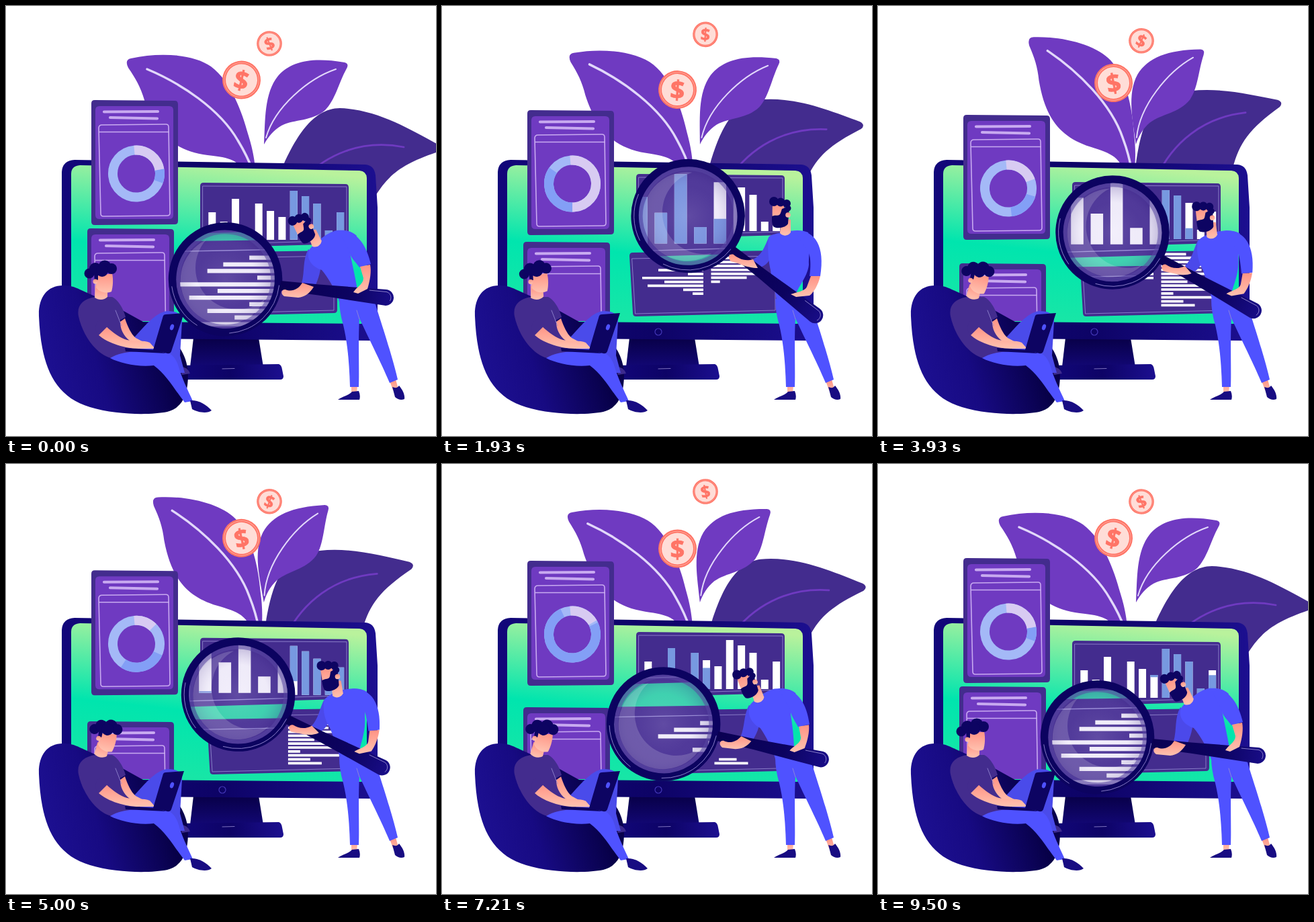
Write an HTML page that moves like this. It is 640x640 px and loops after 9570 ms.

```html
<!DOCTYPE html>
<html lang="en">
<head>
<meta charset="utf-8">
<title>Data analysis</title>
<style>
  html, body { margin: 0; width: 100%; height: 100%; overflow: hidden; background: #fff; }
  svg { display: block; width: 100vw; height: 100vh; }
  .violet { fill: #6f3ac1; }
  .plum { fill: #432c8e; }
  .navy { fill: #0d0462; }
  .shoe { fill: #180c82; }
  .blue { fill: #4f52ff; }
  .skin { fill: url(#skin); }
  .vein, .thin { fill: none; stroke-linecap: round; }
  .thin { stroke: #9a8fd6; stroke-width: .8; }
  .card { fill: none; stroke: #c8aaf0; stroke-width: 1.6; }
  .bold { stroke-width: 4.2; stroke-linecap: round; }
  .dollar { font: 700 38px "Open Sans", sans-serif; fill: #ff7466; stroke: #ff7466; stroke-width: .8; text-anchor: middle; }
  .ring { fill: none; stroke-width: 14; }
</style>
</head>
<body>
<svg viewBox="0 0 640 640">
  <defs>
    <linearGradient id="green" x1=".6" y1="0" x2=".4" y2="1">
      <stop offset="0" stop-color="#b9f29c"/><stop offset=".57" stop-color="#00e5ae"/><stop offset="1" stop-color="#19e6a6"/>
    </linearGradient>
    <linearGradient id="bezel">
      <stop offset="0" stop-color="#12077a"/><stop offset=".5" stop-color="#0d0366"/><stop offset="1" stop-color="#1c0f90"/>
    </linearGradient>
    <linearGradient id="stand" x2="0" y2="1">
      <stop offset="0" stop-color="#080048"/><stop offset="1" stop-color="#120774"/>
    </linearGradient>
    <linearGradient id="bag" x1="0" y1=".55" x2="1" y2=".3">
      <stop offset="0" stop-color="#1d1092"/><stop offset=".35" stop-color="#170a82"/><stop offset=".8" stop-color="#070047"/><stop offset="1" stop-color="#0a0252"/>
    </linearGradient>
    <linearGradient id="grip">
      <stop offset="0" stop-color="#0a0052"/><stop offset=".6" stop-color="#0c0360"/><stop offset="1" stop-color="#190d88"/>
    </linearGradient>
    <linearGradient id="skin" x2="0" y2="1">
      <stop offset="0" stop-color="#ff9384"/><stop offset="1" stop-color="#ffc2b0"/>
    </linearGradient>
    <radialGradient id="glass">
      <stop offset="0" stop-color="#c9b8f0" stop-opacity=".22"/><stop offset=".6" stop-color="#9a82d8" stop-opacity=".16"/><stop offset="1" stop-color="#432c8e" stop-opacity=".36"/>
    </radialGradient>
    <clipPath id="hole"><circle id="holeCircle" r="74"/></clipPath>
    <clipPath id="above"><path d="M0 0H640V469H0Z"/></clipPath>
    <g id="coin">
      <circle r="28.5" fill="#ff7466"/>
      <circle r="25.8" fill="none" stroke="#ffa89c" stroke-width="1"/>
      <circle r="23.5" fill="#ffddd7"/>
    </g>
    <g id="sheet">
      <path class="plum" d="M5 0 124 1Q129 1 129 6V180Q129 185 124 185L5 186Q0 186 0 181V5Q0 0 5 0Z"/>
      <path class="violet" d="M12 9H116Q122 9 122 15V171Q122 177 116 177H12Q6 177 6 171V15Q6 9 12 9Z"/>
      <path class="card bold" d="M19 17.5 99 17M28 26 98 27.5"/>
      <path class="card" d="M16 37 111 36Q115 36 115 40L117 168Q117 172 113 172L18 173Q14 173 14 169L11 42Q11 37 16 37ZM11 47.5H116"/>
    </g>
  </defs>

  <g id="darkLeaf">
    <path class="plum" d="M400 300C403 260 410 243 414 234C430 200 455 152 497 152C553 154 602 184 643 206Q651 212 643 217C590 235 570 250 549 284L480 345Z"/>
    <path class="vein" stroke="#6f3ac1" stroke-width="2.8" d="M436 264C475 220 530 198 592 210"/>
  </g>
  <g id="leftLeaf">
    <path class="violet" d="M186 78C230 68 280 72 305 90C335 112 352 160 360 190C367 212 371 230 373 265L362 256C345 228 335 226 300 222C250 216 225 190 206 140C200 120 193 108 182 92Q176 80 186 78Z"/>
    <path class="vein" stroke="#e2d8fa" stroke-width="3.4" d="M210 94C260 115 318 153 345 200C353 213 361 228 368 247"/>
  </g>
  <g id="rightLeaf">
    <path class="violet" d="M384 206C386 170 384 130 405 104C425 82 455 76 504 84Q511 86 507 93C495 115 490 140 475 155C455 172 430 168 410 178C398 185 390 195 384 206Z"/>
    <path class="vein" stroke="#e2d8fa" stroke-width="2" d="M491 94C450 108 400 150 387 196"/>
  </g>
  <g id="bigCoin"><use href="#coin"/><text class="dollar" y="14">$</text></g>
  <g id="smallCoin"><use href="#coin"/><text class="dollar" y="14">$</text></g>

  <path fill="url(#stand)" d="M279 494H376L383 537H274Z"/>
  <path fill="url(#bezel)" d="M255 535 406 533Q410 534 411 541L413 551Q413 556 408 556H255Z"/>
  <path class="thin" stroke="#3a2fae" d="M322 540 340 539.5"/>
  <path fill="url(#bezel)" d="M102 229 535 236Q548 237 550 252L553 300V488Q553 498 543 498L100 494Q84 493 83 478V247Q84 230 102 229Z"/>
  <path fill="url(#green)" d="M110 237 526 245Q537 246 537 257V464Q537 473 528 473L108 469Q97 469 97 458V250Q97 238 110 237Z"/>
  <circle cx="322" cy="485" r="5" fill="none" stroke="#4438b8" stroke-width="1.2"/>

  <g id="topCard">
    <use href="#sheet"/>
    <g transform="translate(67 109.5) rotate(-95)">
      <circle class="ring" r="35" stroke="#a4b9f7"/>
      <circle class="ring" r="35" stroke="#839ff6" pathLength="360" id="arcBlue"/>
      <circle class="ring" r="35" stroke="#d8cbf2" pathLength="360" id="arcLilac"/>
    </g>
  </g>
  <g clip-path="url(#above)"><use href="#sheet" id="lowCard"/></g>

  <g id="notes"><g id="notesBody">
    <path class="plum" d="M5 3 217 0Q222 0 222 5V88Q222 93 217 93L10 98Q5 98 5 93L0 8Q0 3 5 3Z"/>
    <path class="thin" d="M4 12 217 8V89L9 94Z"/>
    <path id="lines" fill="#fff"/>
  </g></g>
  <g id="chart"><g id="chartBody">
    <path class="plum" d="M5 0 216 2Q221 2 221 7V86Q221 91 216 91L5 97Q0 97 0 92V5Q0 0 5 0Z"/>
    <path class="thin" d="M4 5 218 6V86L4 92Z"/>
    <path id="whiteBars" fill="#fff"/><path id="blueBars" fill="#7799e0"/>
  </g></g>

  <path fill="url(#bag)" d="M85 416C60 416 48 435 49 462C52 530 68 580 125 597C165 609 215 609 240 604C262 598 271 580 271 548C270 520 255 500 240 490L150 440 110 422C102 418 95 416 85 416Z"/>
  <path fill="#3d2b8e" d="M258 537Q270 536 274 547L262 549Z"/>
  <path fill="#4a4bea" d="M185 500C205 478 222 456 240 454Q263 454 262 470L259 520 266 546 252 546 240 508 205 515Z"/>
  <path class="plum" d="M133 433C113 436 105 447 108 462C114 490 134 518 156 524L200 513 180 487 169 468 178 463C174 448 166 437 158 433Z"/>
  <path class="blue" d="M155 524C175 512 205 514 225 513C242 513 251 520 256 534C262 555 270 570 278 588L266 590C250 570 240 550 220 535C198 538 170 532 155 524Z"/>
  <path class="shoe" d="M274 587C285 586 297 592 306 602C300 607 285 605 277 600Z"/>
  <path class="navy" d="M177 509 224 512 238 517 178 514Z"/>
  <g id="typing">
    <path class="skin" d="M170 470 177 465C181 477 186 488 193 494L210 503 200 507 184 498C174 490 170 480 170 470Z"/>
    <path class="skin" d="M137 489 148 476C160 487 170 494 180 497C192 500 205 497 214 501L222 510 198 510C180 510 152 503 137 489Z"/>
  </g>
  <path class="plum" d="M137 491C130 480 134 465 146 468L153 475Z"/>
  <path class="thin" stroke="#6f3ac1" d="M163 453 172 476"/>
  <path fill="#0d0462" d="M234 461Q235 459 238 459L265 457 246 514Q244 518 240 517L219 512Z"/>
  <ellipse cx="247" cy="478" rx="2.8" ry="4.6" fill="#4f52ff" transform="rotate(20 247 478)"/>
  <g id="sitterHead">
    <path class="skin" d="M133 416 151 420 151 433C146 438 138 438 132 434Z"/>
    <path class="skin" d="M134 402 158 398C160 408 159 418 157 425C150 428 140 427 134 419Z"/>
    <path class="navy" d="M131 398H137V407L132 412Z"/>
    <circle class="skin" cx="133" cy="410" r="3.5"/>
    <g class="navy"><circle cx="124" cy="398" r="7.5"/><circle cx="133" cy="391" r="9"/><circle cx="147" cy="388" r="9.5"/><circle cx="157" cy="391" r="8"/><circle cx="143" cy="394" r="9"/></g>
  </g>

  <path class="skin" d="M514 564H523L522 577H514ZM571 558 580 556 584 570 576 572Z"/>
  <path class="shoe" d="M494 586C500 581 510 580 515 574L525 573Q528 580 526 586ZM575 567Q582 570 585 565C590 571 594 578 593 585Q586 588 579 582Z"/>
  <path class="blue" d="M496 436 523 434 549 441C553 455 575 520 583 556L571 561C560 535 545 505 526 465C524 500 526 540 525 567L512 567C511 530 508 500 502 475Q496 455 496 436Z"/>
  <path class="thin" stroke="#3a3ae0" d="M526 466 522 453"/>
  <path id="farSleeve" fill="#4b49ea"/>
  <path id="torso" class="blue"/>
  <path id="nearSleeve" class="blue"/>
  <g id="manHead">
    <path class="skin" d="M-6 -22 8 -20 8 -1C4 5 -4 5 -8 0Z"/>
    <path class="skin" d="M-19 -42-3 -44 2 -20-14 -10C-19 -14-20 -20-19 -42Z"/>
    <path class="navy" d="M-20 -25C-14 -28-9 -24-7 -30L-5 -36 6 -40 4 -14C0 -7-14 -6-18 -10C-20 -14-20 -18-20 -25Z"/>
    <circle class="skin" cx="4" cy="-27" r="3.8"/>
    <g class="navy"><circle cx="-17" cy="-47" r="7"/><circle cx="-7" cy="-46" r="6.5"/><circle cx="2" cy="-44" r="6"/><circle cx="4" cy="-37" r="4.5"/></g>
  </g>

  <g clip-path="url(#hole)">
    <rect width="640" height="640" fill="#2ee0a8"/>
    <use href="#notes" id="zoomNotes"/><use href="#chart" id="zoomChart"/>
  </g>
  <g id="magnifier">
    <circle r="74" fill="url(#glass)"/>
    <circle r="70.5" fill="none" stroke="#5a48a4" stroke-width="6" opacity=".55"/>
    <path fill="#fff" opacity=".17" d="M-35-55A66 66 0 1 0 62 22A62 62 0 0 1-35-55Z"/>
    <circle r="79" fill="none" stroke="#0c0360" stroke-width="11.5"/>
    <circle class="thin" r="80.5" stroke="#352a9e" pathLength="100" stroke-dasharray="22 10 14 54"/>
    <path fill="url(#grip)" d="M82-7 140-8 240-12A12 12 0 0 1 240 12L140 8 82 7Z"/>
    <path class="thin" stroke="#352a9e" d="M215-8 240-8.500A8.500 8.500 0 0 1 247 4"/>
  </g>
  <path id="farHand" class="skin"/>
  <path id="nearHand" class="skin"/>
</svg>
<script>
const LOOP = 9570;
const TIMES = [0, 1930, 3930, 6000, 7210, 8210, 9500, LOOP];
const $ = id => document.getElementById(id);
const set = (id, name, value) => $(id).setAttribute(name, value);
const move = (id, value) => set(id, 'transform', value);
const clamp = v => Math.max(0, Math.min(1, v));

// Monotone cubic track through values at TIMES, or straight segments.
function track(values, linear) {
  if (values.length < TIMES.length) values = [...values, values[0]];
  const secant = i => (values[i + 1] - values[i]) / (TIMES[i + 1] - TIMES[i]);
  const slope = i => {
    if (i === 0 || i === TIMES.length - 1) return 0;
    const a = secant(i - 1), b = secant(i);
    return a * b > 0 ? 2 * a * b / (a + b) : 0;
  };
  return t => {
    let i = 0;
    while (t >= TIMES[i + 1]) i++;
    const d = TIMES[i + 1] - TIMES[i], u = (t - TIMES[i]) / d;
    if (linear) return values[i] + (values[i + 1] - values[i]) * u;
    const w = u * u * (3 - 2 * u);
    return values[i] * (1 - w) + values[i + 1] * w
      + d * u * (1 - u) * (slope(i) * (1 - u) - slope(i + 1) * u);
  };
}

const raise = track([0, 1, .714, .571, .194, .016, 0]);
const leftTilt = track([0, 2.6, 11.1, 7.4, 1.9, 0, 0]);
const rightTilt = track([0, -2.9, -10.3, -13.4, -8.8, -3.8, 0]);
const darkTilt = track([0, -8.3, -17.2, -12.3, -6.9, -2.4, 0]);
const topCardY = track([140, 155, 162, 152, 144, 141, 140]);
const lowCardY = track([331, 351, 383, 383, 362, 343, 331]);
const chartY = track([263, 250, 262, 254, 250, 256, 263]);
const notesX = track([271, 279, 300, 295, 284, 277, 271]);
const zoomY = track([413, 470, 451, 435, 424, 414, 413]);
const nod = track([0, -3, 13, 13, 13, 13, 0]);
const lilacEnd = track([85, 185, 75, 40, 65, 80, 85]);
const blueStart = track([85, 185, 112, 125, 70, 108, 85]);
const blueEnd = track([115, 310, 178, 280, 340, 172, 115]);
const waveFront = track([0, 4.4, 9.3, 14.6, 17.73, 20, 23.82, 24], true);
const waveTail = track([-5, 0, 4.9, 9.5, 13.5, 16.3, 18.9, 19], true);
const typed = track([11, 8.24, 4.8, 0, 4.4, 7, 11]);

const barHeights = [41, 27, 61, 14.5, 54, 43, 34, 73, 65, 54, 14, 41];
const leftLines = [30, 53, 67, 23, 91, 58, 83, 30, 67, 43, 75];
const rightLines = [37, 48, 58, 64, 60, 66, 53, 39, 62, 76, 18, 76, 33, 50];

// Each part of the standing man: leaning pose, upright pose.
const poses = {
  torso: ['M452 362C460 352 478 337 492 334C505 333 515 335 522 342C518 360 511 362 513 372C518 398 524 420 524 437L496 440C492 425 480 405 470 393C455 388 445 375 452 362Z',
          'M486 344C490 340 500 338 508 337C525 333 535 333 545 337C550 355 545 370 546 385C544 405 527 420 524 437L498 440C497 425 490 405 489 393C486 380 484 360 486 344Z'],
  nearSleeve: ['M495 334C522 333 536 355 543 384L526 389C518 378 512 374 511 364Z',
               'M525 335C553 332 571 355 563 402L547 402C549 390 549 375 546 368Z'],
  farSleeve: ['M450 362C441 378 445 395 440 413L459 419C466 405 468 395 470 378Z',
              'M486 345C480 358 477 370 462 378L470 390C480 388 492 380 492 360Z'],
  nearHand: ['M527 388L542 385C544 395 542 408 538 421L524 428L517 426C522 418 532 414 532 405Z',
             'M549 402L563 402C560 415 553 427 547 431L527 433L519 429C528 426 541 424 543 418Z'],
  farHand: ['M441 412L458 418C452 428 444 433 435 434L414 432C408 428 410 421 416 422C425 426 435 422 441 412Z',
            'M463 377L470 390C463 390 452 388 443 384L430 380C424 374 428 368 434 370C440 375 450 381 463 377Z']
};
const morph = ([a, b], p) => {
  const ends = b.match(/[\d.]+/g);
  let i = 0;
  return a.replace(/[\d.]+/g, n => (+n + (ends[i++] - n) * p).toFixed(2));
};
const box = (x, y, w, h) => w > 0 && h > 0 ? `M${x} ${y}h${w}v${h}h${-w}Z` : '';

function drawBars(t) {
  const front = waveFront(t), width = front - waveTail(t);
  let white = '', blue = '';
  barHeights.forEach((h, i) => {
    const age = (front - i + 24) % 12, x = 12.3 + 17.35 * i;
    const top = clamp(age) * h, bottom = clamp(age - width) * h;
    white += box(x, 85 - h, 11, h);
    blue += box(x, 85 - top, 11, top - bottom);
  });
  set('whiteBars', 'd', white);
  set('blueBars', 'd', blue);
}

function drawLines(t) {
  const count = typed(t), end = t * .0038, start = (t - 4000) * .0038;
  let d = '';
  leftLines.forEach((len, i) => {
    const w = len * clamp(count - i);
    d += box(110 - w, 15.5 + 5.85 * i, w, 3.7);
  });
  rightLines.forEach((len, i) => {
    const from = len * clamp(start - i);
    d += box(121.5 + from, 3.5 + 5.85 * i, len * clamp(end - i) - from, 3.7);
  });
  set('lines', 'd', d);
}

function drawMan(p) {
  for (const id in poses) set(id, 'd', morph(poses[id], p));
  move('manHead', `translate(${463 + 48 * p} ${354 - 16 * p}) rotate(${-27 * (1 - p)})`);
  const angle = 6.5 + 31.5 * p, rad = angle * Math.PI / 180, reach = 241 + 5 * p;
  const x = 566 - 6 * p * p - reach * Math.cos(rad), y = 434 + 30 * p - reach * Math.sin(rad);
  move('magnifier', `translate(${x} ${y}) rotate(${angle})`);
  set('holeCircle', 'cx', x);
  set('holeCircle', 'cy', y);
}

function draw(t) {
  const wave = Math.cos(4 * Math.PI * t / LOOP), sway = shift => Math.cos(2 * Math.PI * (t + shift) / LOOP);
  move('bigCoin', `translate(350.5 ${118 - 8 * wave}) rotate(${13 * sway(0)})`);
  move('smallCoin', `translate(392 ${48.5 + 7.5 * wave}) rotate(${-24 * sway(700)}) scale(.66)`);
  move('leftLeaf', `rotate(${leftTilt(t)} 372 298)`);
  move('rightLeaf', `rotate(${rightTilt(t)} 384 207)`);
  move('darkLeaf', `rotate(${darkTilt(t)} 400 333)`);
  move('topCard', `translate(127 ${topCardY(t)})`);
  move('lowCard', `translate(121 ${lowCardY(t)})`);
  const from = blueStart(t);
  set('arcBlue', 'stroke-dasharray', `${blueEnd(t) - from} 360`);
  set('arcBlue', 'stroke-dashoffset', -from);
  set('arcLilac', 'stroke-dasharray', `${lilacEnd(t)} 360`);
  move('chartBody', `translate(289 ${chartY(t)})`);
  move('notesBody', `translate(${notesX(t)} 364)`);
  const lift = zoomY(t) - 1.69 * 404;
  move('zoomChart', `translate(-222 ${lift}) scale(1.69)`);
  move('zoomNotes', `translate(-231 ${lift}) scale(1.69)`);
  drawBars(t);
  drawLines(t);
  drawMan(raise(t));
  move('sitterHead', `rotate(${nod(t)} 143 430)`);
  const busy = t > 4000 && t < 9000 ? Math.sin((t - 4000) * Math.PI / 250) : 0;
  move('typing', `rotate(${busy * .8} 145 480)`);
}

function tick() {
  draw(performance.now() % LOOP);
  requestAnimationFrame(tick);
}
tick();
</script>
</body>
</html>
```
